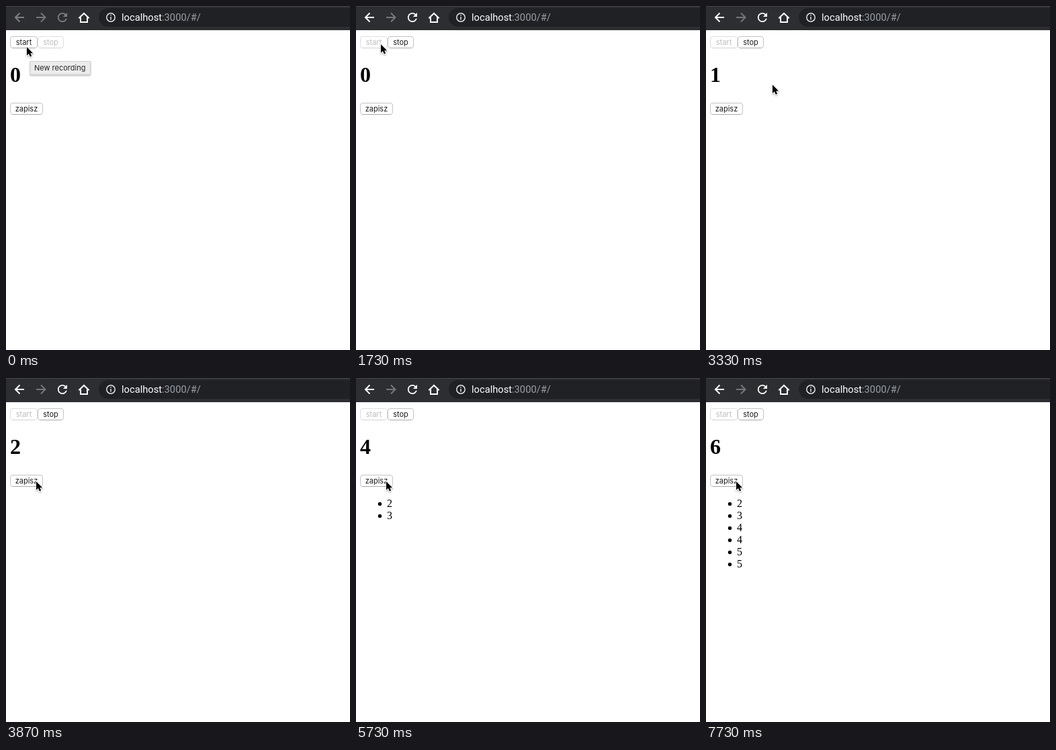
Recreate the animation shown at these times as an HTML page. Size 512 by 512 pixels, loop 8 s.

```html
<!DOCTYPE html>
<html lang="pl">
<head>
<meta charset="utf-8">
<style>
html, body { margin: 0; width: 100%; height: 100%; overflow: hidden; background: #fff; }
svg { display: block; width: 100%; height: 100%; }
.ui { font: 11px Inter, "Liberation Sans", sans-serif; }
.url { font: 14.7px Roboto, "Liberation Sans", sans-serif; }
.count { font: bold 32px "Liberation Serif", serif; }
.list { font: 16px "Liberation Serif", serif; }
.icon { fill: none; stroke: #fff; stroke-width: 2; }
.btn text { text-anchor: middle; fill: #1c1c1c; }
.btn rect { fill: #fff; stroke: #c3c3c3; }
.btn path { stroke: #a9a9a9; }
.btn.off text { fill: #bdbdbd; }
.btn.off rect { stroke: #dedede; }
.btn.off path { stroke: #d2d2d2; }
.btn.down text { fill: #fff; }
.btn.down rect { fill: url(#blue); stroke: #2a83f2; }
.btn.down path { stroke: #0a5fd8; }
</style>
</head>
<body>
<svg viewBox="0 0 512 512">
  <defs>
    <linearGradient id="blue" x2="0" y2="1">
      <stop stop-color="#6bb3fb"/><stop offset="1" stop-color="#0a7bfe"/>
    </linearGradient>
    <filter id="soft" x="-50%" y="-50%" width="200%" height="200%">
      <feDropShadow dx="0" dy="1.2" stdDeviation="1.2" flood-opacity=".35"/>
    </filter>
  </defs>

  <rect width="512" height="36" fill="#2d2e32"/>
  <rect width="512" height="1" fill="#44464a"/>
  <rect x="138" y="3" width="400" height="28" rx="14" fill="#202125"/>
  <path id="back" class="icon" d="M27 17H14M20.5 10.5L14 17l6.5 6.5"/>
  <path class="icon" style="stroke:#75777b" d="M45 17h13M52 10.5l6.5 6.5L52 23.5"/>
  <path id="reload" transform="translate(73.4 6.4) scale(.88)" d="M17.65 6.35C16.2 4.9 14.21 4 12 4c-4.42 0-7.99 3.58-7.99 8s3.57 8 7.99 8c3.73 0 6.84-2.55 7.73-6h-2.08c-.82 2.33-3.04 4-5.65 4-3.31 0-6-2.69-6-6s2.69-6 6-6c1.66 0 3.14.69 4.22 1.78L13 11h7V4z"/>
  <path class="icon" d="M108.3 18.3l7.7-7.3 7.7 7.3M111 16.5V24h10v-7.5"/>
  <g class="icon" style="stroke:#e4e5e7;stroke-width:1.5">
    <circle cx="156" cy="17" r="6.2"/><path d="M156 16v4.5M156 13v1.6"/>
  </g>
  <text class="url" x="172" y="22" fill="#fff">localhost<tspan fill="#9aa0a6">:3000/#/</tspan></text>

  <g id="buttons" class="ui"></g>
  <text id="count" class="count" x="6" y="113"></text>
  <g id="list" class="list"></g>

  <g id="tip" class="ui">
    <rect x="36" y="82.5" width="89.5" height="19.5" fill="#ececec" stroke="#c9c9c9" stroke-width=".8" filter="url(#soft)"/>
    <text x="42" y="96" fill="#262626">New recording</text>
  </g>
  <path id="cursor" d="M0 0V12.8L2.9 10.1 4.9 14.6 7.2 13.6 5.3 9.3H9.2Z" stroke="#fff" stroke-width="1.6" paint-order="stroke" filter="url(#soft)"/>
</svg>
<script>
const $ = id => document.getElementById(id);
const LOOP = 8000, FPS = 15;

// All times below are in ticks of 1/15 s.
const path = [
  [0, 31, 61], [3, 31, 61], [4, 30, 61], [17, 30, 61], [18, 35, 57],
  [19, 38, 54.5], [23, 37, 57], [29, 37, 57], [34, 111, 109],
  [47, 111, 109], [58, 45, 154]
];
const counts = [41, 56, 71, 86, 101, 116];
const saves = [[64, 2], [79, 3], [95, 4], [99, 4], [104, 5], [114, 5]];
const presses = [[63, 64], [78, 79], [94, 95], [98, 100], [103, 104], [113, 114]];

function button(id, label, x, y, w) {
  $('buttons').insertAdjacentHTML('beforeend',
    `<g id="${id}"><rect x="${x + .5}" y="${y + .5}" width="${w - 1}" height="17" rx="3.5"/>
     <path d="M${x + 3.5} ${y + 17.5}h${w - 7}"/>
     <text x="${x + w / 2}" y="${y + 13}">${label}</text></g>`);
}
button('start', 'start', 6, 45, 41);
button('stop', 'stop', 47, 45, 39);
button('save', 'zapisz', 6, 144, 49);

$('list').innerHTML = saves.map(([, n], i) =>
  `<g><circle cx="35.5" cy="${187.5 + 18 * i}" r="2.7"/><text x="46" y="${192 + 18 * i}">${n}</text></g>`).join('');

function cursorAt(k) {
  const i = path.findIndex(p => p[0] > k);
  if (i < 0) return path.at(-1).slice(1);
  const a = path[i - 1], b = path[i];
  const u = (k - a[0]) / (b[0] - a[0]), e = u * u * (3 - 2 * u);
  return [1, 2].map(j => a[j] + (b[j] - a[j]) * e);
}

function setState(id, off, down) {
  $(id).setAttribute('class', 'btn' + (off ? ' off' : down ? ' down' : ''));
}

function draw(ms) {
  const k = Math.floor(ms % LOOP * FPS / 1000 + .1);
  const fade = Math.min(1, Math.max(0, (k - 7) / 4));
  const running = k >= 26;
  const grey = 128 + 127 * fade;
  $('back').style.stroke = $('reload').style.fill = `rgb(${grey},${grey},${grey})`;
  $('tip').style.opacity = 1 - fade;
  setState('start', running, k === 25);
  setState('stop', !running);
  setState('save', false, presses.some(([a, b]) => k >= a && k < b));
  $('count').textContent = counts.filter(c => k >= c).length;
  saves.forEach(([at], i) => $('list').children[i].style.display = k >= at ? '' : 'none');
  $('cursor').setAttribute('transform', `translate(${cursorAt(k)})`);
}

let begin;
function frame(now) {
  begin ??= now;
  draw(now - begin);
  requestAnimationFrame(frame);
}
draw(0);
requestAnimationFrame(frame);
</script>
</body>
</html>
```
